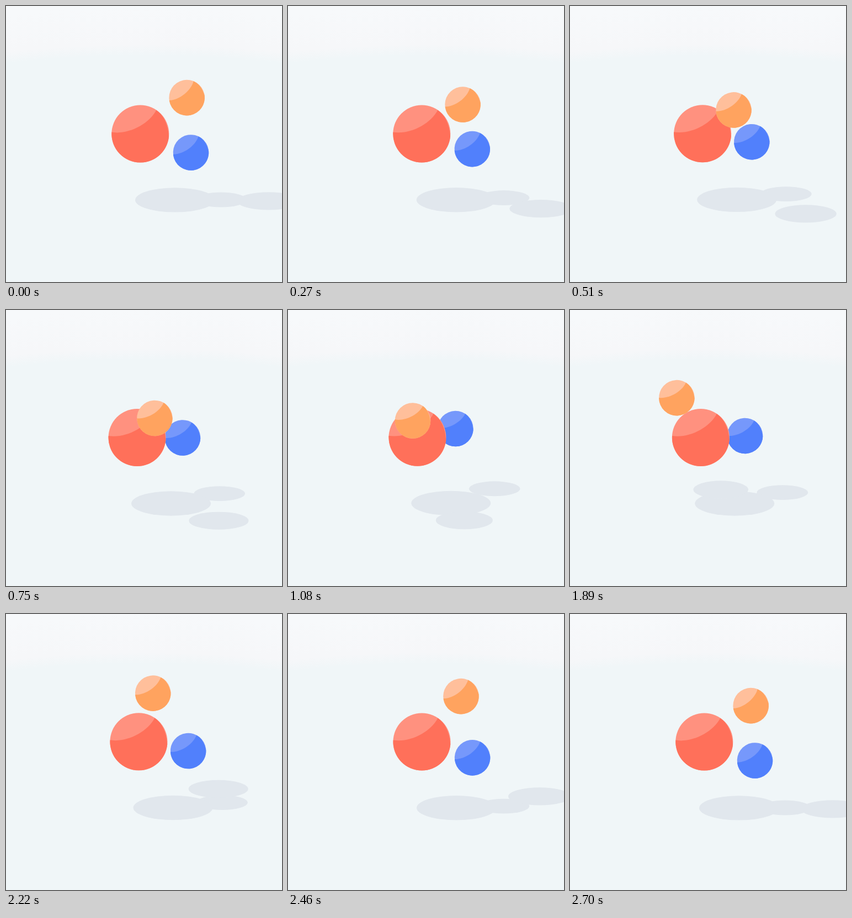
These frames come from a looping animation (500 px wide and 500 px high, 2.73 s). An HTML page:

```html
<!DOCTYPE html>
<html lang="en">
<head>
<meta charset="utf-8">
<title>Orbiting balls</title>
<style>
  html, body { margin: 0; width: 100%; height: 100%; overflow: hidden; }
  svg { display: block; width: 100%; height: 100%; }
</style>
</head>
<body>
<svg viewBox="0 0 500 500">
  <defs>
    <radialGradient id="backdrop" gradientUnits="userSpaceOnUse" cx="250" cy="2310" r="2310">
      <stop offset=".961" stop-color="#f0f6f8"/>
      <stop offset=".97" stop-color="#f6f7f9"/>
      <stop offset="1" stop-color="#f7f9fb"/>
    </radialGradient>
    <circle id="disc" r="52"/>
    <path id="shade" d="M-51.9-3C-22 2 16-17.5 29-43C42-34 50-18 51.8 4.5A52 52 0 0 1 0 52A52 52 0 0 1-51.9-3Z"/>
  </defs>
  <rect width="500" height="500" fill="url(#backdrop)"/>
  <g fill="#e1e7ed">
    <ellipse id="blueShadow" rx="46.4" ry="13.4"/>
    <ellipse id="redShadow" rx="72" ry="22.2"/>
    <ellipse id="orangeShadow" ry="16.1"/>
  </g>
  <g id="blue"><use href="#disc" fill="#7698fb"/><use href="#shade" fill="#5180fc"/></g>
  <g id="red"><use href="#disc" fill="#ff917f"/><use href="#shade" fill="#ff705a"/></g>
  <g id="orange"><use href="#disc" fill="#ffbf9b"/><use href="#shade" fill="#ffa35f"/></g>
</svg>
<script>
const STEP = 30, LOOP = 2730, SPAN = 2700, HALF = SPAN / 2, SMALL = 32.3 / 52;
const el = id => document.getElementById(id);
const cos = deg => Math.cos(deg * Math.PI / 180);
const sin = deg => Math.sin(deg * Math.PI / 180);

function place(id, x, y, scale, angle) {
  el(id).setAttribute('transform',
    `translate(${x.toFixed(2)} ${y.toFixed(2)}) rotate(${angle.toFixed(2)}) scale(${scale})`);
}

function shadow(id, x, y, rx) {
  const e = el(id);
  e.setAttribute('cx', x);
  e.setAttribute('cy', y);
  if (rx) e.setAttribute('rx', rx);
}

function draw(t) {
  // p runs 0 to 1 and back; s is the same with easing
  const p = 1 - Math.abs(t - HALF) / HALF;
  const s = p * p * (3 - 2 * p);
  const bend = s * (1 - s);

  place('red', 243.3 - 9.9 * s, 231.6 - 0.9 * s, 1, 0);
  shadow('redShadow', 306 - 12 * s, 351.4 - 1.5 * s);

  // Red and blue sway along a short path
  place('blue', 335 - 38.4 * (s - 0.79 * bend), 265.5 - 55.6 * (s + 0.12 * bend), SMALL, -9 + 9 * s);
  shadow('blueShadow', 389.5 + 18.5 * s - 39.7 * s * s, 351 - 30 * (s + 0.13 * bend));

  // Orange circles on a tilted ellipse, faster on the way back
  const u = 360 * t / SPAN + 6 - 50 * p - 22 * p * p * (1 - p);
  place('orange', 249.3 + 78.8 * cos(u), 172 + 28.5 * sin(u - 18), SMALL, -12 + 14 * s);
  const sx = 356.8 + 120 * cos(u + 1);
  shadow('orangeShadow', sx, 349.3 + 33.4 * sin(u + 1), 39.4 + 0.038 * sx);
}

function tick() {
  const t = performance.now() % LOOP;
  draw(Math.floor(t / STEP) * STEP);
  requestAnimationFrame(tick);
}
tick();
</script>
</body>
</html>
```
